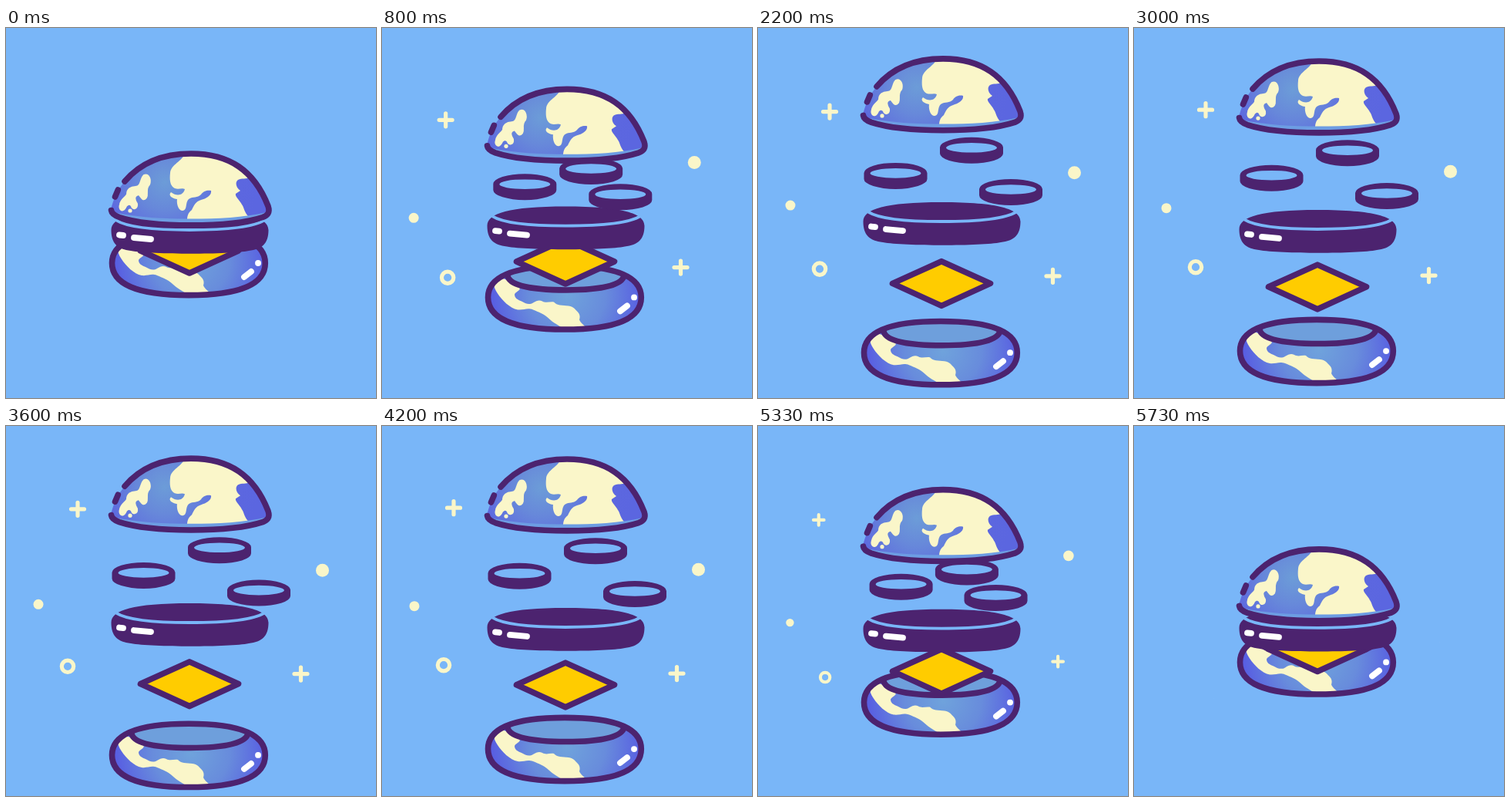
Recreate the animation shown at these times as an HTML page. Size 480 by 480 pixels, loop 5790 ms.

```html
<!DOCTYPE html>
<html lang="en">
<head>
<meta charset="utf-8">
<title>Planet burger</title>
<style>
  html, body { margin: 0; width: 100%; height: 100%; overflow: hidden; background: #79b6f8; }
  svg { display: block; width: 100%; height: 100%; }
  .line { fill: none; stroke: #4c236f; stroke-width: 7.6; stroke-linecap: round; stroke-linejoin: round; }
  .dark { fill: #4c236f; }
  .land { fill: #faf6c9; }
  .shine { fill: none; stroke: #fff; stroke-width: 7.8; stroke-linecap: round; }
  .spark { fill: none; stroke: #faf6c9; stroke-width: 5.2; stroke-linecap: round; }
</style>
</head>
<body>
<svg viewBox="0 0 480 480">
  <defs>
    <radialGradient id="sky" gradientUnits="userSpaceOnUse" cx="206" cy="200" r="120">
      <stop offset="0" stop-color="#6c9cd8"/>
      <stop offset=".3" stop-color="#6788da"/>
      <stop offset=".65" stop-color="#5d68df"/>
      <stop offset="1" stop-color="#5b66e0"/>
    </radialGradient>
    <radialGradient id="sea" gradientUnits="userSpaceOnUse" cx="240" cy="302" r="100">
      <stop offset="0" stop-color="#6fa3dc"/>
      <stop offset=".5" stop-color="#688cdc"/>
      <stop offset="1" stop-color="#575ce2"/>
    </radialGradient>
    <path id="dome" d="M154 199C176 173 206 163 240 163C290 163 322 185 340 231C343 240 339 243 333 245.500C310 253 275 255.800 240 255.800C205 255.800 170 253 147 245.500C140 243 137 240 136 236C139 222 145 209 154 199Z"/>
    <path id="base" d="M137.500 305C137.500 280 165 264.300 237 264.300C309 264.300 336.300 280 336.300 305C336.300 332 305 346.600 237 346.600C170 346.600 137.500 332 137.500 305Z"/>
    <clipPath id="domeClip"><use href="#dome"/></clipPath>
    <clipPath id="baseClip"><use href="#base"/></clipPath>
    <path id="onion" class="dark" fill-rule="evenodd" d="M-41-4A41 13 0 0 1 41-4V4A41 13 0 0 1-41 4ZM-33-3.500A33 6.300 0 0 0 33-3.500A33 6.300 0 0 0-33-3.500Z"/>
    <path id="plus" class="spark" d="M-8.500 0H8.500M0-8.500V8.500"/>
  </defs>

  <g id="sparks">
    <use href="#plus"/>
    <circle class="land" r="8.5"/>
    <circle class="land" r="6.5"/>
    <circle class="spark" r="7.7"/>
    <use href="#plus"/>
  </g>

  <g id="bottom">
    <use href="#base" fill="url(#sea)"/>
    <path clip-path="url(#baseClip)" class="land" d="M146 284C150 279 158 279 164 284C168 288 173 288 178 292C181 296 174 297 172 301C172 306 176 308 181 310C186 313 191 315 196 312C201 309 204 308 208 310C213 313 218 310 223 311C227 316 234 315 242 316C249 317 251 321 254 324C257 327 257 331 256 334C258 339 263 341 266 346L238 347C229 341 222 338 216 332C210 326 203 324 196 321C188 318 184 322 176 321C166 319 156 309 150 300C146 294 144 289 146 284Z"/>
    <path d="M163 277C168 267 205 264 239 264C280 264 310 269 314 277C311 290 283 295.500 239 295.500C195 295.500 165 290 163 277Z" fill="#6e9fdc"/>
    <path class="line" d="M163 277C165 290 195 295.500 239 295.500C283 295.500 311 290 314 277"/>
    <use href="#base" class="line"/>
    <path class="shine" d="M309 323L318 316M327 305h.1"/>
  </g>

  <path id="cheese" class="line" style="fill:#fc0" d="M174.500 289L238 260.300L301.500 289L238 318Z"/>

  <g id="patty">
    <path class="dark" d="M136.500 262C136.500 246 165 237 238 237C312 237 340.500 246 340.500 262C340.500 280 332 287 315 289C290 294 190 294 162 289C145 287 136.500 280 136.500 262Z"/>
    <path d="M143 249.500C158 259 195 262 238 262C282 262 320 259 335 249.500" fill="none" stroke="#79b6f8" stroke-width="3.800"/>
    <path class="shine" d="M147 268.500L152 269M166 272L188 274"/>
  </g>

  <g id="onions">
    <use href="#onion"/><use href="#onion"/><use href="#onion"/>
  </g>

  <g id="top">
    <use href="#dome" fill="url(#sky)"/>
    <g clip-path="url(#domeClip)">
      <g class="land">
        <path d="M232 160C232 172 214 176 213 188C212 198 213 205 219 208C224 210 228 207 232 209C230 217 222 219 214 213C210 217 215 221 222 222C221 229 224 237 229 237C236 236 232 227 237 222C243 218 248 221 253 216C256 211 262 210 266 211C267 217 260 221 253 223C246 225 244 230 241 236C236 240 235 244 235 250L283 249L314 244C309 239 309 233 306 229C303 223 297 219 298 215L304 211C298 207 297 200 301 197C306 194 311 197 317 193L300 160Z"/>
        <path stroke="#faf6c9" stroke-width="2" d="M179 191C186 188 188 198 186 203C180 209 185 215 182 220C177 226 175 218 172 216C165 218 167 223 170 228C171 235 164 236 163 231C161 227 156 229 155 233C151 240 146 235 148 229C149 222 154 221 157 216C157 209 162 206 168 206C176 206 174 195 179 191Z"/>
        <circle cx="161" cy="237" r="2.600"/>
      </g>
      <path d="M140 239C172 246 205 247.500 240 247.500C275 247.500 308 246 338 239L333 246L240 257L147 246Z" fill="#6d9de3"/>
    </g>
    <path class="line" d="M154 199C176 173 206 163 240 163C290 163 322 185 340 231C343 240 339 243 333 245.500C310 253 275 255.800 240 255.800C205 255.800 170 253 147 245.500C140 243 137 240 136.500 236.500M145.300 210L141.500 219"/>
  </g>
</svg>

<script>
const LOOP = 5790, BOB = 1200;
const $ = id => document.getElementById(id);

// Sine ease from 0 to 1 between two times
const ease = (t, from, to) => {
  const p = Math.min(1, Math.max(0, (t - from) / (to - from)));
  return (1 - Math.cos(Math.PI * p)) / 2;
};
// 0 when stacked, 1 when apart
const open = (t, a, b, c, d) => ease(t, a, b) - ease(t, c, d);
const bob = (t, amp, peak) => amp * Math.cos(2 * Math.PI * (t - peak) / BOB);
const place = (el, x, y, s = 1) =>
  el.setAttribute("transform", `translate(${x.toFixed(2)} ${y.toFixed(2)}) scale(${s.toFixed(3)})`);

// rise: shift when apart; span: opening and closing times
const layers = [
  { el: $("top"), rise: -120.4, amp: 2.9, peak: 330, span: [170, 1190, 5030, 5810] },
  { el: $("patty"), rise: -4, amp: 7, peak: 385, span: [170, 1190, 5030, 5790] },
  { el: $("cheese"), rise: 46.2, amp: 4.1, peak: 330, span: [300, 1600, 4980, 5790] },
  { el: $("bottom"), rise: 118, amp: 5.9, peak: 160, span: [320, 1430, 4815, 5800] }
];
const onions = [
  { x: 277, y: 161.8, amp: 3.2, from: 262 },
  { x: 178.5, y: 194.3, amp: 2.6, from: 196 },
  { x: 328, y: 217.3, amp: 4.6, from: 280 }
];
const sparks = [
  { x: 93, y: 107, amp: -1.6 },
  { x: 410.5, y: 186.7, amp: -1.1 },
  { x: 42, y: 232.5, amp: 2.4 },
  { x: 80, y: 311, amp: -1.6 },
  { x: 382.5, y: 321.3, amp: -0.5 }
];

function draw(t) {
  for (const { el, rise, amp, peak, span } of layers) {
    place(el, 0, open(t, ...span) * (rise + bob(t, amp, peak)));
  }
  onions.forEach(({ x, y, amp, from }, i) => {
    const k = open(t, 230, 1230, 5010, 5740);
    place($("onions").children[i], from + (x - from) * k, 228 + (y + bob(t, amp, 330) - 228) * k);
  });

  const size = open(t, 170, 720, 5150, 5765);
  const turn = (1 - open(t, 150, 1150, 5000, 5790)) * 16 * Math.PI / 180;
  const c = Math.cos(turn), s = Math.sin(turn);
  sparks.forEach(({ x, y, amp }, i) => {
    const dx = x - 240, dy = y + bob(t, amp, 400) - 250;
    place($("sparks").children[i], 240 + dx * c + dy * s, 250 - dx * s + dy * c, size);
  });
}

function tick() {
  draw(performance.now() % LOOP);
  requestAnimationFrame(tick);
}
tick();
</script>
</body>
</html>
```
